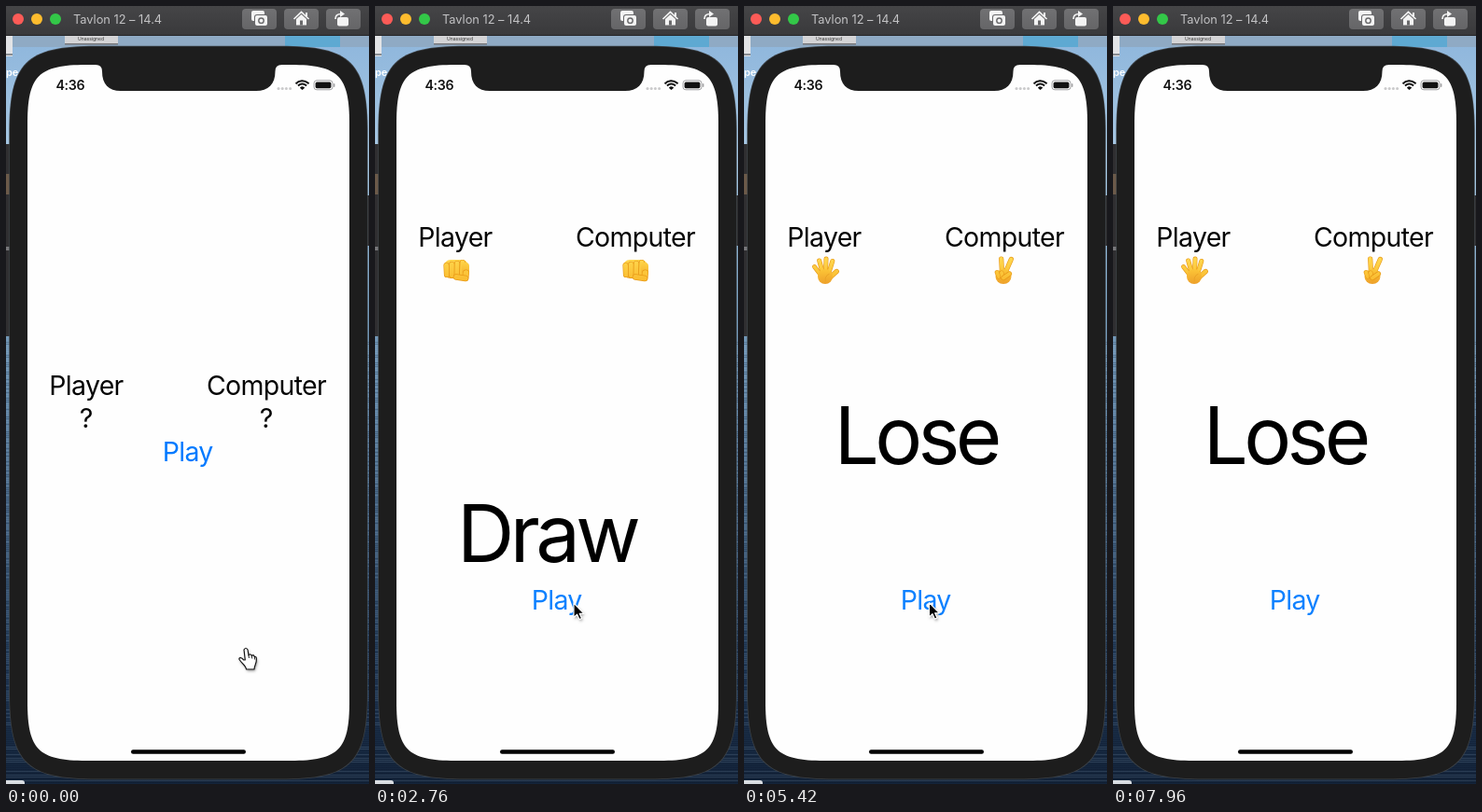
Recreate the animation shown at these times as an HTML page with a canvas. Size 389x834 px, loop 8000 ms.

```html
<!DOCTYPE html>
<html lang="en">
<head>
<meta charset="utf-8">
<title>Hand game</title>
<style>
  html, body { margin: 0; width: 100%; height: 100%; overflow: hidden; background: #1d1d1d; }
  canvas { display: block; width: 389px; height: 834px; }
</style>
</head>
<body>
<canvas id="stage" width="389" height="834"></canvas>
<script>
const ctx = document.getElementById('stage').getContext('2d');
const LOOP = 8000;
const FONT = 'Inter, "Liberation Sans", sans-serif';

// Each click: press and release time, hands shown afterwards, result.
const clicks = [
  { down: 2010, up: 2075, player: 'fist', computer: 'fist', result: 'Draw' },
  { down: 3230, up: 3360, player: 'palm', computer: 'victory', result: 'Lose' },
  { down: 4950, up: 5080, player: 'palm', computer: 'victory', result: 'Lose' },
  { down: 5760, up: 5890, player: 'fist', computer: 'victory', result: 'Win' },
  { down: 6880, up: 7020, player: 'victory', computer: 'palm', result: 'Win' },
  { down: 7630, up: 7700, player: 'palm', computer: 'victory', result: 'Lose' }
];
const resultBaseline = { Win: 385, Lose: 490.7, Draw: 596.4 };

// Pointer tip as [time, x, y].
const handPath = [[70, 257, 688], [460, 204, 598], [860, 188, 475], [1000, 192, 458]];
const arrowPath = [
  [1400, 188, 472], [1610, 190, 475], [2010, 190, 475], [2340, 194, 502], [2480, 199, 522],
  [2760, 213, 640], [3230, 199, 641], [3500, 198, 639], [4130, 197, 638], [4550, 195, 637],
  [5080, 195, 637], [5480, 199, 640], [5690, 200, 638]
];

const clamp = v => Math.max(0, Math.min(1, v));
const mix = (a, b, k) => a + (b - a) * k;

function along(path, t) {
  if (t <= path[0][0]) return path[0].slice(1);
  for (let i = 1; i < path.length; i++) {
    const [t0, x0, y0] = path[i - 1], [t1, x1, y1] = path[i];
    if (t <= t1) {
      const k = (t - t0) / (t1 - t0);
      return [mix(x0, x1, k), mix(y0, y1, k)];
    }
  }
  return path[path.length - 1].slice(1);
}

function rect(x, y, w, h, color) {
  ctx.fillStyle = color;
  ctx.fillRect(x, y, w, h);
}

function round(x, y, w, h, r, color) {
  ctx.beginPath();
  ctx.roundRect(x, y, w, h, r);
  ctx.fillStyle = color;
  ctx.fill();
}

// Rounded rectangle whose corners ease into the straight sides.
function smoothRect(x, y, w, h, r, color) {
  const reach = 1.5 * r, pull = 0.28 * r;
  const corners = [[x, y, 1, 1], [x + w, y, -1, 1], [x + w, y + h, -1, -1], [x, y + h, 1, -1]];
  ctx.beginPath();
  corners.forEach(([cx, cy, sx, sy], i) => {
    const onSide = d => [cx, cy + sy * d], onEdge = d => [cx + sx * d, cy];
    const [from, to] = i % 2 ? [onEdge, onSide] : [onSide, onEdge];
    ctx.lineTo(...from(reach));
    ctx.bezierCurveTo(...from(pull), ...to(pull), ...to(reach));
  });
  ctx.closePath();
  ctx.fillStyle = color;
  ctx.fill();
}

function dot(x, y, r, color) {
  ctx.beginPath();
  ctx.arc(x, y, r, 0, Math.PI * 2);
  ctx.fillStyle = color;
  ctx.fill();
}

function vertical(y0, y1, ...stops) {
  const g = ctx.createLinearGradient(0, y0, 0, y1);
  stops.forEach((c, i) => g.addColorStop(i / (stops.length - 1), c));
  return g;
}

function polygon(points) {
  ctx.beginPath();
  points.forEach(([x, y]) => ctx.lineTo(x, y));
  ctx.closePath();
}

function text(str, x, y, size, color, { weight = 400, align = 'center', spacing = 0 } = {}) {
  ctx.font = `${weight} ${size}px ${FONT}`;
  ctx.letterSpacing = spacing + 'px';
  ctx.textAlign = align;
  ctx.fillStyle = color;
  ctx.fillText(str, align === 'center' ? x + spacing / 2 : x, y);
  ctx.letterSpacing = '0px';
}

function drawDesktop() {
  rect(0, 32, 389, 802, vertical(32, 834, '#8eb6dc', '#a8c8e3', '#7fa5c4', '#5f83a4', '#42607f', '#223a57', '#14243a'));

  // Ripples on the water
  for (let y = 360; y < 834; y += 2) {
    const ripple = Math.sin(y * 12.9898) * 43758.5453;
    const shade = ripple - Math.floor(ripple);
    rect(0, y, 389, 1, shade > 0.5 ? 'rgba(190,215,235,.12)' : 'rgba(0,10,30,.2)');
  }

  rect(0, 32, 389, 12, '#8faac4');
  rect(299, 32, 59, 12, '#5ea9d2');
  rect(63, 32, 57, 9, '#d4d4d6');
  rect(63, 40, 57, 1.5, '#77777a');
  text('Unassigned', 91, 37, 5, '#333');
  rect(0, 32, 7, 22, '#e2e3e6');
  rect(0, 51, 7, 2, '#888c92');
  text('pe', 0, 75, 11, '#fff', { weight: 600, align: 'left' });
  rect(0, 148, 5, 206, '#302f31');
  rect(0, 180, 4, 22, '#6c5a49');
  rect(0, 258, 4, 4, '#77777a');
  rect(386, 203, 3, 54, '#302f31');
  round(-6, 830, 26, 8, 3, '#d9dde2');
}

function drawTitleBar() {
  rect(0, 0, 389, 32, vertical(0, 32, '#454547', '#39393b'));
  rect(0, 31, 389, 1, '#252527');
  dot(13, 14, 6, '#fc5b57');
  dot(33, 14, 6, '#fdbc2e');
  dot(53, 14, 6, '#33c748');
  text('Tavlon 12 – 14.4', 72, 19, 12.8, '#c2c2c4', { align: 'left' });
  [253, 298, 343].forEach(x => round(x, 3, 37, 22, 4, vertical(3, 25, '#717173', '#656567')));

  // Stacked screenshots
  round(263, 5, 14, 11, 2, '#f3f3f3');
  round(266, 9, 15, 13, 3, '#69696b');
  round(267, 10, 13, 11, 2, '#f3f3f3');
  dot(273.5, 15.7, 3.4, '#69696b');
  dot(273.5, 15.7, 2, '#f3f3f3');

  // Home
  ctx.strokeStyle = '#f3f3f3';
  ctx.lineWidth = 1.7;
  ctx.lineCap = 'butt';
  ctx.beginPath();
  ctx.moveTo(308.5, 14);
  ctx.lineTo(316.5, 6.5);
  ctx.lineTo(324.5, 14);
  ctx.stroke();
  rect(321, 7, 2, 4, '#f3f3f3');
  ctx.fillStyle = '#f3f3f3';
  polygon([[311, 14], [316.5, 9], [322, 14], [322, 20.5], [311, 20.5]]);
  ctx.fill();
  rect(315, 15.5, 3, 5, '#69696b');

  // Rotate
  round(355, 12, 12, 9.5, 2, '#f3f3f3');
  ctx.beginPath();
  ctx.moveTo(353, 14);
  ctx.quadraticCurveTo(353, 8.5, 359, 8.5);
  ctx.stroke();
  ctx.fillStyle = '#f3f3f3';
  polygon([[358, 5], [363, 8.5], [358, 12]]);
  ctx.fill();
}

function drawPhone() {
  smoothRect(3.3, 42.7, 384.4, 786.6, 62.5, '#3d4247');
  smoothRect(4, 43.4, 383, 785.2, 62, '#1d1d1d');
  smoothRect(23, 63, 345, 746, 42, '#fefefe');

  ctx.fillStyle = '#1d1d1d';
  ctx.beginPath();
  ctx.moveTo(96, 62);
  ctx.lineTo(96, 63);
  ctx.quadraticCurveTo(103, 63, 103, 70);
  ctx.bezierCurveTo(103, 84, 110, 91, 123, 91);
  ctx.lineTo(268, 91);
  ctx.bezierCurveTo(281, 91, 288.5, 84, 288.5, 70);
  ctx.quadraticCurveTo(288.5, 63, 295.5, 63);
  ctx.lineTo(295.5, 62);
  ctx.fill();

  text('4:36', 69, 90, 14.2, '#111', { weight: 600, spacing: -0.3 });
  for (let i = 0; i < 4; i++) dot(292 + i * 4.2, 88.5, 1.5, '#cacacb');

  ctx.strokeStyle = '#111';
  ctx.lineWidth = 2;
  ctx.lineCap = 'butt';
  [6, 9.3].forEach(r => {
    ctx.beginPath();
    ctx.arc(317.5, 89.5, r, -Math.PI * 0.77, -Math.PI * 0.23);
    ctx.stroke();
  });
  ctx.beginPath();
  ctx.moveTo(317.5, 90);
  ctx.arc(317.5, 90, 3.5, -Math.PI * 0.77, -Math.PI * 0.23);
  ctx.fillStyle = '#111';
  ctx.fill();

  ctx.beginPath();
  ctx.roundRect(330, 79.8, 20, 10, 3);
  ctx.lineWidth = 1;
  ctx.strokeStyle = '#a2a2a4';
  ctx.stroke();
  round(331.6, 81.4, 16.8, 6.8, 1.6, '#111');
  round(351, 83, 1.4, 4, 0.7, '#a2a2a4');
  round(134, 797.3, 123, 4.4, 2.2, '#050505');
}

// A finger: outlined capsule from one point to another.
function finger(x0, y0, x1, y1, width) {
  ctx.lineCap = 'round';
  [['#e89a18', width], [vertical(-14, 14, '#ffd950', '#f9b82c'), width - 1.3]].forEach(([color, w]) => {
    ctx.strokeStyle = color;
    ctx.lineWidth = w;
    ctx.beginPath();
    ctx.moveTo(x0, y0);
    ctx.lineTo(x1, y1);
    ctx.stroke();
  });
}

function blob(x, y, rx, ry) {
  ctx.beginPath();
  ctx.ellipse(x, y, rx, ry, 0, 0, Math.PI * 2);
  ctx.fillStyle = vertical(-12, 15, '#ffd84e', '#fac035', '#eda02a');
  ctx.fill();
}

const hands = {
  fist() {
    round(-13, -11, 26, 20, 7, vertical(-12, 12, '#ffd950', '#f0a52b'));
    for (let i = 0; i < 4; i++) finger(-10.5 + i * 5.8, -5 - i, -10 + i * 5.4, 5 + i * 0.8, 6.2);
    round(6, -8, 8, 14, 4, vertical(-10, 8, '#ffd445', '#f4ae2c'));
    finger(10.5, 3, 10, 8.5, 7);
    finger(10, 9, 0, 7.5, 6.4);
  },
  palm() {
    finger(-5, 5, -11.5, -3.5, 4.8);
    finger(-3, 2, -6.3, -10, 5);
    finger(0.5, 2, 1, -12, 5);
    finger(4, 3, 7.8, -9.5, 5);
    finger(4, 9, 12.3, 1.5, 5.2);
    blob(0, 7, 8, 8);
    ctx.strokeStyle = '#e9a126';
    ctx.lineWidth = 0.9;
    ctx.beginPath();
    ctx.arc(6, 10, 6, Math.PI * 0.9, Math.PI * 1.4);
    ctx.stroke();
  },
  victory() {
    finger(-2.5, 3, -3.3, -12, 5.2);
    finger(1, 3, 7.3, -11.5, 5.2);
    blob(-1, 7, 8.5, 8);
    finger(-7.8, 2.5, -6, 7, 5);
    finger(-3, 3, -2, 7.5, 5);
    finger(5.5, 4, -1, 8.5, 5.2);
  }
};

function drawHand(kind, x) {
  ctx.save();
  ctx.translate(x, 283);
  hands[kind]();
  ctx.restore();
}

function drawGame(t) {
  const shown = clicks.filter(c => t >= c.up).pop();
  const pressed = clicks.some(c => t >= c.down && t < c.up);
  const shift = shown ? 159 : 0;
  const label = { spacing: -0.7 };

  text('Player', 86.3, 416.5 - shift, 28.5, '#050505', label);
  text('Computer', 279.3, 416.5 - shift, 28.5, '#050505', label);
  if (shown) {
    drawHand(shown.player, 87);
    drawHand(shown.computer, 279);
    text(shown.result, 186.5, resultBaseline[shown.result], 85, '#000', { spacing: -4.6 });
  } else {
    text('?', 86, 451.5, 28.5, '#050505');
    text('?', 279, 451.5, 28.5, '#050505');
  }

  let alpha = 1;
  if (pressed) alpha = 0.25;
  else if (shown) alpha = mix(0.25, 0.95, 1 - (1 - clamp((t - shown.up) / 270)) ** 1.5);
  ctx.globalAlpha = alpha;
  text('Play', 195, 488.3 + shift, 28.5, '#007aff', label);
  ctx.globalAlpha = 1;
}

function paintPointer([x, y], trace, fill, stroke) {
  ctx.save();
  ctx.translate(x, y);
  trace();
  ctx.lineJoin = 'round';
  ctx.shadowColor = 'rgba(0,0,0,.4)';
  ctx.shadowBlur = 3;
  ctx.shadowOffsetX = 1;
  ctx.shadowOffsetY = 2;
  ctx.fillStyle = fill;
  ctx.fill();
  ctx.shadowColor = 'transparent';
  ctx.lineWidth = 1.2;
  ctx.strokeStyle = stroke;
  ctx.stroke();
  ctx.restore();
}

function traceArrow() {
  polygon([[0, 0], [0, 15.5], [3.6, 12.2], [6, 17.6], [8.6, 16.5], [6.2, 11.3], [11, 11.3]]);
}

function traceHand() {
  ctx.beginPath();
  ctx.moveTo(-2, 2);
  ctx.quadraticCurveTo(0, -1, 2, 2);
  ctx.lineTo(3, 8);
  ctx.quadraticCurveTo(5, 5.8, 6.3, 8.5);
  ctx.quadraticCurveTo(8.3, 6.8, 9.3, 9.6);
  ctx.quadraticCurveTo(11.4, 9, 11.4, 12);
  ctx.bezierCurveTo(11.5, 17, 9.5, 18, 9, 23);
  ctx.lineTo(0.5, 23);
  ctx.bezierCurveTo(0, 19, -4, 17, -7, 12.5);
  ctx.bezierCurveTo(-7.8, 10, -4.5, 9.8, -2.5, 12.8);
  ctx.lineTo(-0.7, 13);
  ctx.closePath();
}

function drawPointer(t) {
  if (t < 1040) {
    const [x, y] = along(handPath, t);
    paintPointer([x, y], traceHand, '#fff', '#111');
    ctx.lineWidth = 0.9;
    ctx.strokeStyle = '#111';
    ctx.beginPath();
    [[3, 8], [6.3, 8.5], [9.3, 9.6]].forEach(([dx, dy]) => {
      ctx.moveTo(x + dx, y + dy);
      ctx.lineTo(x + dx + 0.4, y + dy + 3);
    });
    ctx.stroke();
  } else if (t >= 1400 && t < 5690) {
    paintPointer(along(arrowPath, t), traceArrow, '#000', '#fff');
  }
}

function frame(now) {
  const t = now % LOOP;
  drawDesktop();
  drawTitleBar();
  drawPhone();
  drawGame(t);
  drawPointer(t);
  requestAnimationFrame(() => frame(performance.now() - start));
}

const start = performance.now();
frame(0);
</script>
</body>
</html>
```
